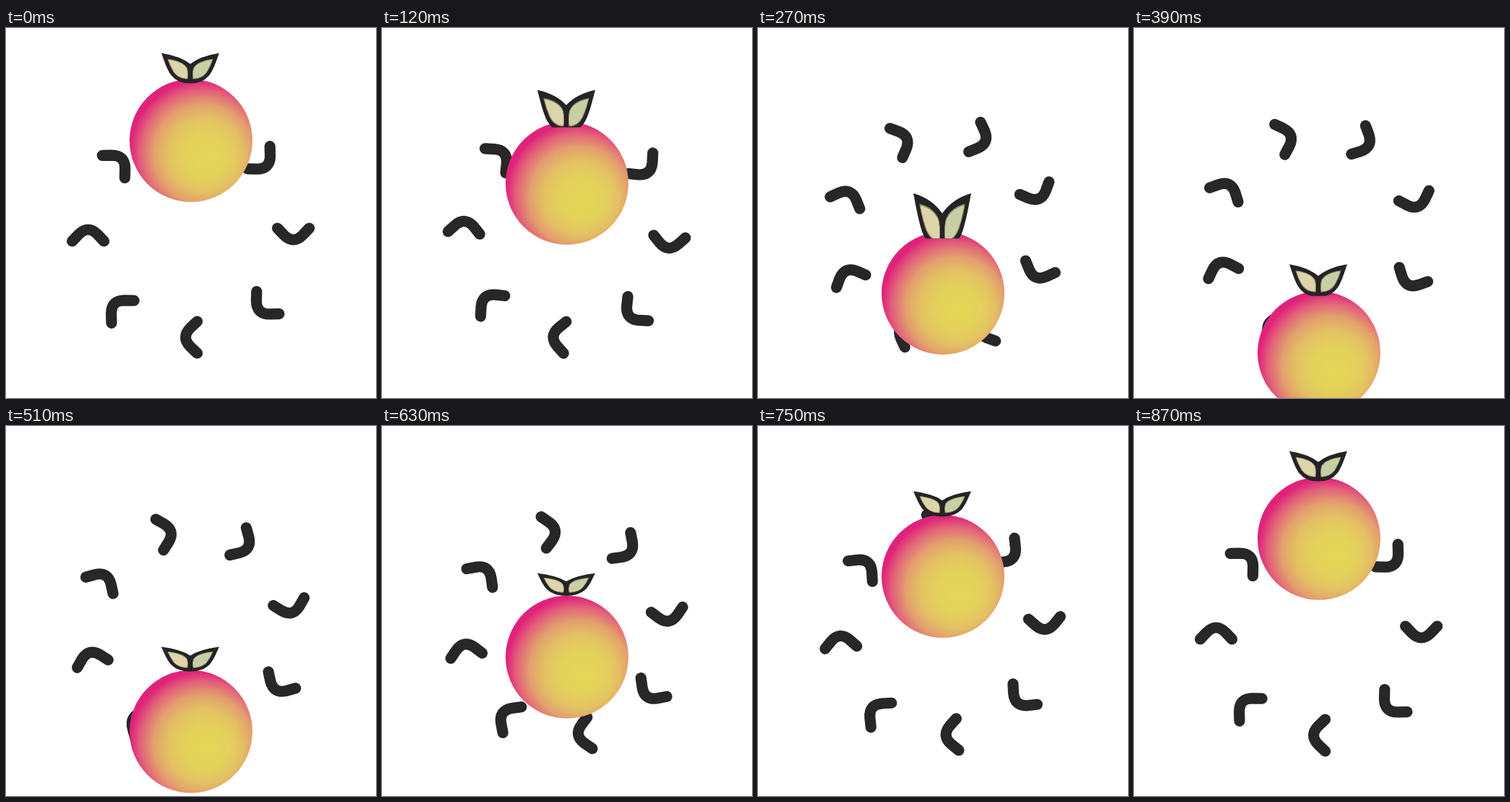
Recreate the animation shown at these times as an HTML page. Size 512 by 512 pixels, loop 0.9 s.

```html
<!DOCTYPE html>
<html lang="en">
<head>
<meta charset="utf-8">
<title>Bouncing fruit</title>
<style>
  html, body { margin: 0; width: 100%; height: 100%; overflow: hidden; background: #fff; }
  svg { display: block; width: 100vw; height: 100vh; }
</style>
</head>
<body>
<svg viewBox="0 0 512 512">
  <defs>
    <radialGradient id="skin" gradientUnits="userSpaceOnUse" cx="14" cy="15" r="105" fx="24" fy="25">
      <stop offset="0" stop-color="#e4d755"/>
      <stop offset=".3" stop-color="#e4d15c"/>
      <stop offset=".5" stop-color="#e3bf64"/>
      <stop offset=".66" stop-color="#e39e6e"/>
      <stop offset=".82" stop-color="#e2607a"/>
      <stop offset=".94" stop-color="#e0237a"/>
    </radialGradient>
    <clipPath id="cut"><rect id="cutBox" x="-60" y="-200" width="120"/></clipPath>
    <path id="tick" d="M120-9L129 .5Q142 13.5 155 .5L164-9"/>
  </defs>
  <g id="ring" fill="none" stroke="#272628" stroke-width="15.2" stroke-linecap="round"></g>
  <g id="fruit">
    <circle r="85" fill="url(#skin)"/>
    <g transform="translate(-1 0)" clip-path="url(#cut)">
      <g id="leaves">
        <path fill="#242325" d="M-40 0Q-14 4 0 15Q14 4 40 0C37 8 32 24 26 31Q17 42 0 42Q-17 42-26 31C-32 24-37 8-40 0Z"/>
        <g stroke="#8b8862" stroke-width="1">
          <path fill="#ddd4ab" d="M-31 8.500C-19 10-8 14-4.500 21Q-2.500 28-4 35.500C-12 35.500-19 32-23 26Q-28 18-31 8.500Z"/>
          <path fill="#c9cfa5" d="M31 8.500C19 10 8 14 4.500 21Q2.500 28 4 35.500C12 35.500 19 32 23 26Q28 18 31 8.500Z"/>
        </g>
      </g>
    </g>
  </g>
</svg>
<script>
  const LOOP = 900, STEP = 30, LAST = 870, LOW = 420;
  const TOP_Y = 156, DROP = 298;
  const $ = id => document.getElementById(id);
  const ring = $('ring'), fruit = $('fruit'), leaves = $('leaves'), cutBox = $('cutBox');

  for (let i = 0; i < 8; i++) {
    const use = document.createElementNS('http://www.w3.org/2000/svg', 'use');
    use.setAttribute('href', '#tick');
    use.setAttribute('transform', `rotate(${i * 45})`);
    ring.append(use);
  }

  const ease = u => u * u * (3 - 2 * u);

  function fallAt(t) {
    return t < LOW ? ease(t / LOW) : 1 - ease((t - LOW) / (LAST - LOW));
  }

  // Leaves stretch on the way down and flatten on the way up.
  function stretchAt(t) {
    const peak = 255;
    if (t < peak) return 1 + 0.88 * ease(t / peak);
    if (t < LOW) return 1 + 0.88 * ease((LOW - t) / (LOW - peak));
    const u = (t - LOW) / (LAST - LOW);
    return 1 - 1.25 * u * (1 - u) ** 1.3;
  }

  function draw(t) {
    const s = stretchAt(t), extra = s - 1;
    ring.setAttribute('transform', `translate(255.6 286) rotate(${360 * t / LAST})`);
    fruit.setAttribute('transform', `translate(256 ${TOP_Y - 0.2 + DROP * fallAt(t)})`);
    leaves.setAttribute('transform', `translate(0 ${-121 - 20 * extra}) scale(1 ${s})`);
    cutBox.setAttribute('height', 121 + 4 * extra);
  }

  const start = performance.now();
  function tick(now) {
    const t = Math.min(LAST, Math.max(0, now - start) % LOOP);
    draw(Math.floor(t / STEP) * STEP);
    requestAnimationFrame(tick);
  }
  draw(0);
  requestAnimationFrame(tick);
</script>
</body>
</html>
```
